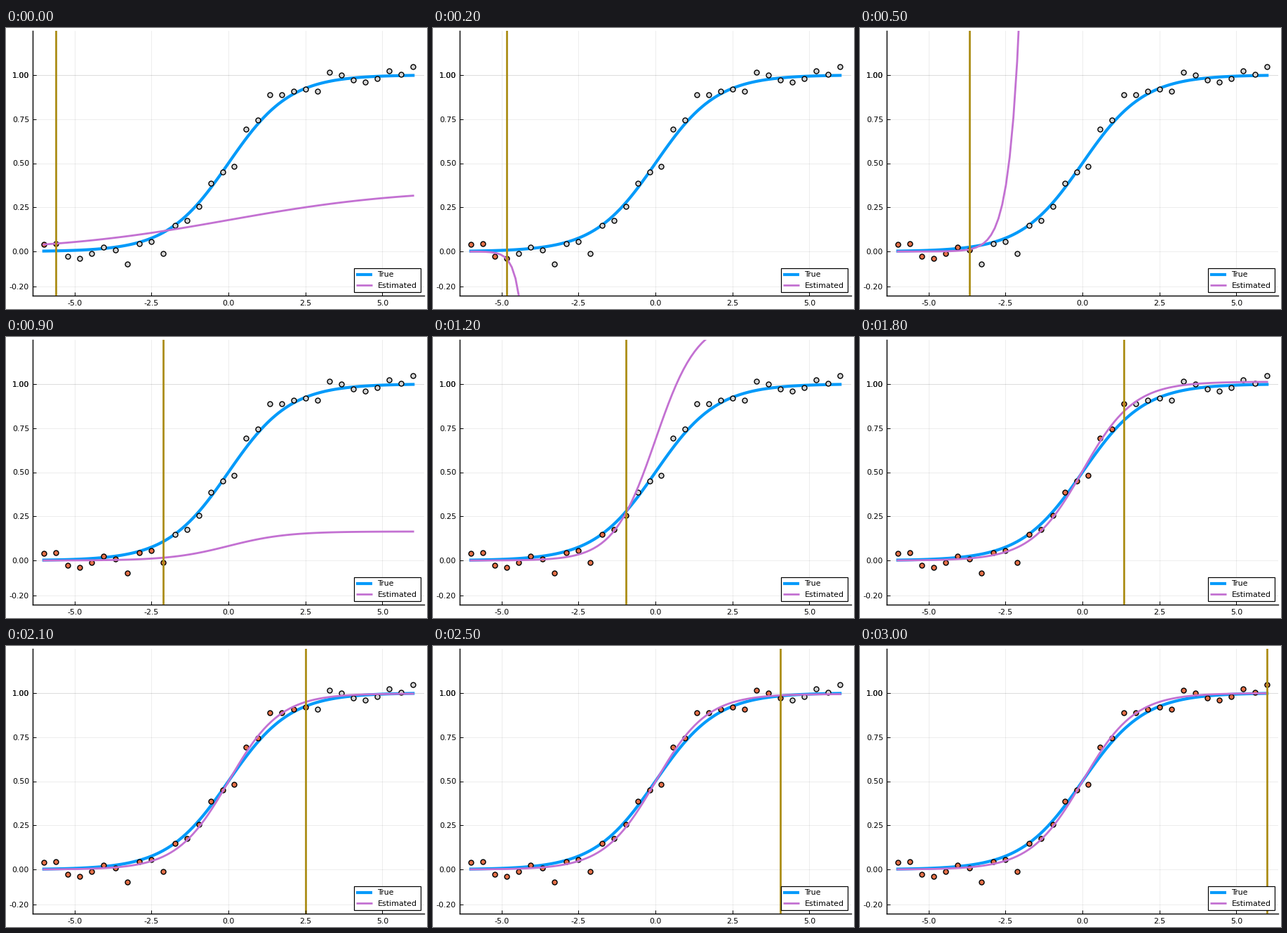
These frames come from a looping animation (600 px wide and 400 px high, 3100 ms). A matplotlib script:

```python
import numpy as np
import matplotlib.pyplot as plt
from matplotlib.animation import FuncAnimation
from matplotlib.patches import Rectangle

W, H, DPI = 600, 400, 100
PX = 72 / DPI  # points per pixel
LEFT, RIGHT, TOP, BOTTOM = 38, 596, 4, 381
FRAMES, INTERVAL = 31, 100

BLUE, ORANGE, GREY = "#009afa", "#e36f47", "#d3d3d3"
PURPLE, GOLD = "#c371d2", "#ac8e18"

xs = np.linspace(-6, 6, 32)
ys = np.array([
    0.0399, 0.0449, -0.027, -0.039, -0.011, 0.025, 0.008, -0.071,
    0.045, 0.057, -0.011, 0.148, 0.176, 0.255, 0.387, 0.450,
    0.482, 0.693, 0.745, 0.888, 0.888, 0.908, 0.920, 0.908,
    1.015, 0.999, 0.972, 0.960, 0.980, 1.023, 1.003, 1.047])
grid = np.linspace(-6, 6, 100)


def sigmoid(x):
    return 1 / (1 + np.exp(-x))


def gain(b, n):
    """Best amplitude for steepness b, and how much squared error it removes."""
    s = sigmoid(b * xs[:n])
    dot, norm = s @ ys[:n], s @ s
    return dot / norm, dot * dot / norm


def fit(n, step=0.005, steepest=12):
    """Local least-squares fit of a * sigmoid(b * x), starting at b = 1."""
    b = 1.0
    best = gain(b, n)[1]
    direction = step if gain(b + step, n)[1] > best else -step
    while abs(b) < steepest:
        score = gain(b + direction, n)[1]
        if score <= best:
            break
        b, best = b + direction, score
    return gain(b, n)[0], b


curves = []
for count in range(2, len(xs) + 1):
    a, b = fit(count)
    curves.append(np.clip(a * sigmoid(b * grid), -1000, 1000))

fig = plt.figure(figsize=(W / DPI, H / DPI), dpi=DPI, facecolor="white")
ax = fig.add_axes([LEFT / W, 1 - BOTTOM / H, (RIGHT - LEFT) / W, (BOTTOM - TOP) / H])
ax.set(xlim=(-6.36, 6.36), ylim=(-0.25, 1.25), xticks=[], yticks=[])
ax.patch.set_visible(False)
for side in ("top", "right"):
    ax.spines[side].set_visible(False)
for side in ("left", "bottom"):
    ax.spines[side].set_linewidth(1.4 * PX)

# Pixel-space layer for ticks, labels and the legend
top = fig.add_axes([0, 0, 1, 1])
top.set(xlim=(0, W), ylim=(H, 0))
top.axis("off")


def stroke(x, y, color="black", width=1.0, z=2):
    top.plot(x, y, color=color, lw=width * PX, solid_capstyle="butt", zorder=z)


def label(x, y, text, align):
    top.text(x, y, text, ha=align, va="center_baseline", family="DejaVu Sans",
             fontsize=11 * PX, color="black", zorder=12)


def x_pixel(x):
    return LEFT + (x + 6.36) / 12.72 * (RIGHT - LEFT)


def y_pixel(y):
    return BOTTOM - (y + 0.25) / 1.5 * (BOTTOM - TOP)


for x in (-5, -2.5, 0, 2.5, 5):
    ax.axvline(x, color="black", alpha=0.1, lw=0.7 * PX, zorder=0)
    p = x_pixel(x)
    stroke([p, p], [BOTTOM, BOTTOM - 5])
    label(p, 391, f"{x:.1f}", "center")

# The top tick is doubled, which makes it look heavier
for y in (-0.2, 0, 0.25, 0.5, 0.75, 1, 1):
    ax.axhline(y, color="black", alpha=0.1, lw=0.7 * PX, zorder=0)
    p = y_pixel(y)
    stroke([LEFT, LEFT + 5], [p, p])
    label(33, p, f"{y:.2f}", "right")

top.add_patch(Rectangle((495.5, 341.5), 95.5, 34.5, facecolor="white",
                        edgecolor="black", lw=1.2 * PX, zorder=10))
for y, color, width, name in ((350.5, BLUE, 4.2, "True"),
                              (366, PURPLE, 2.8, "Estimated")):
    stroke([498.5, 522], [y, y], color, width, 11)
    label(530, y, name, "left")


def markers(color):
    return ax.plot([], [], "o", ms=7 * PX, mfc=color, mec="black",
                   mew=1.4 * PX, zorder=3)[0]


ax.plot(grid, sigmoid(grid), color=BLUE, lw=4.2 * PX, zorder=2)
seen, unseen = markers(ORANGE), markers(GREY)
estimate, = ax.plot([], [], color=PURPLE, lw=2.8 * PX, zorder=4)
cursor = ax.axvline(0, color=GOLD, lw=2.8 * PX, zorder=5)


def draw(i):
    n = i + 2
    seen.set_data(xs[:n], ys[:n])
    unseen.set_data(xs[n:], ys[n:])
    estimate.set_data(grid, curves[i])
    cursor.set_xdata([xs[n - 1]] * 2)
    return seen, unseen, estimate, cursor


anim = FuncAnimation(fig, draw, frames=FRAMES, interval=INTERVAL,
                     repeat=True, repeat_delay=0, blit=False)
plt.show()
```
